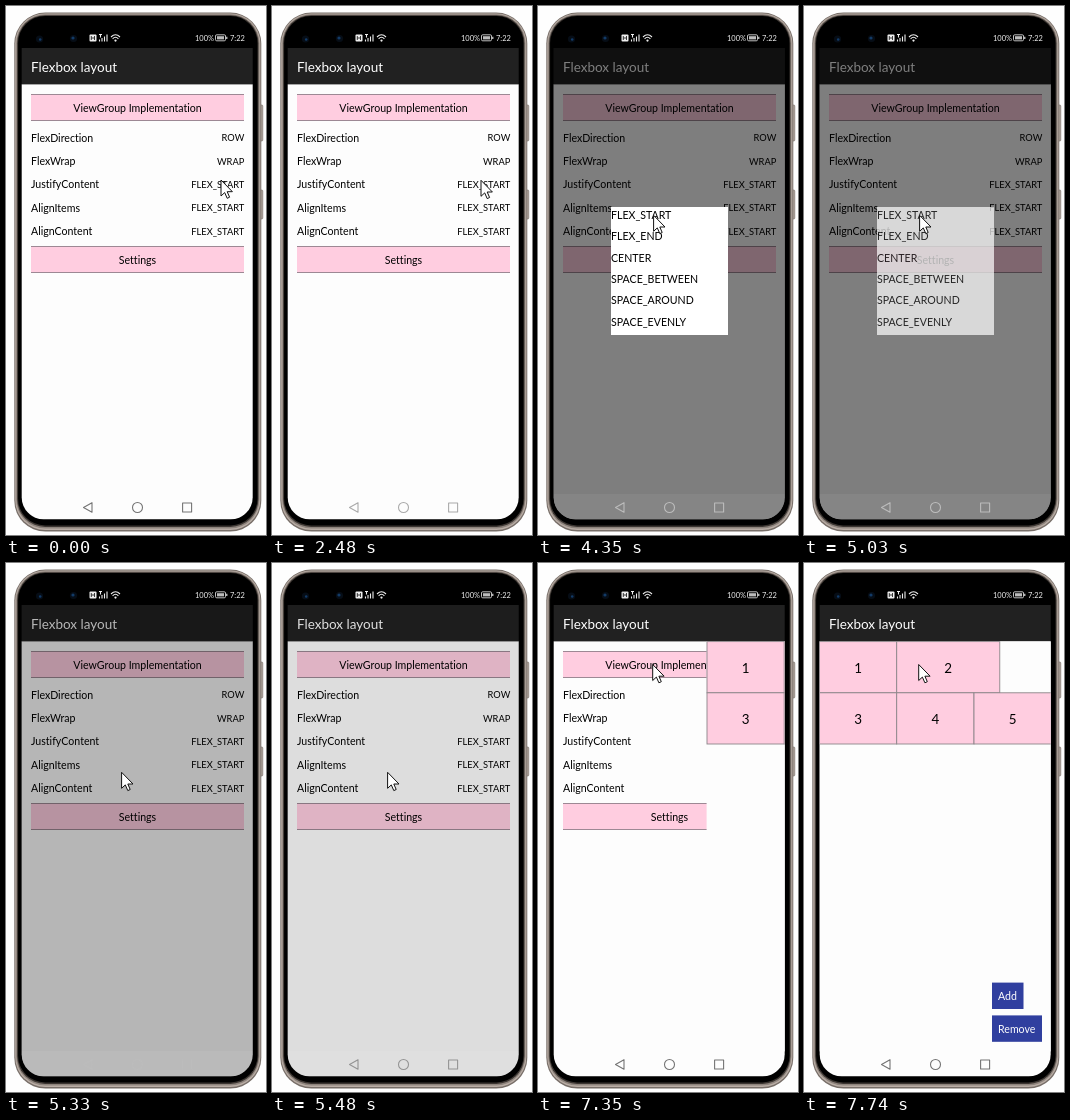
An HTML page for the animation above (8 s loop, 260x529 px).

```html
<!DOCTYPE html>
<html lang="en">
<head>
<meta charset="utf-8">
<title>Flexbox layout</title>
<style>
  html, body { margin: 0; width: 260px; height: 529px; overflow: hidden; background: #fefefe; }
  svg { display: block; }
  text { font-family: Lato, sans-serif; font-size: 10.6px; font-variant-ligatures: none; }
  .title { font-size: 13.5px; fill: #fff; }
  .small { font-size: 9.3px; text-anchor: end; }
  .mid { text-anchor: middle; }
  .number { font-size: 13.4px; text-anchor: middle; }
  .light { fill: #fff; }
  .status { font-size: 7.5px; fill: #eee; }
</style>
</head>
<body>
<svg width="260" height="529" viewBox="0 0 260 529">
  <defs>
    <clipPath id="screen"><rect x="15.7" y="-20" width="231" height="533.3" rx="22"/></clipPath>
  </defs>

  <g fill="#b0a49c" stroke="#766d67" stroke-width=".6">
    <rect x="253.5" y="99" width="3.3" height="36" rx="1"/>
    <rect x="253.5" y="184" width="3.3" height="29" rx="1"/>
  </g>
  <g id="frame"></g>

  <g clip-path="url(#screen)">
    <rect x="15" y="42" width="233" height="37" fill="#212121"/>
    <text class="title" x="25" y="66">Flexbox layout</text>
    <rect x="15" y="78.4" width="233" height="436" fill="#fdfdfd"/>
    <g id="form"></g>
    <g id="page"></g>
    <rect id="dim" x="15" y="42" width="233" height="472"/>
    <rect id="strip" x="15" y="488" width="233" height="26" fill="#fff" opacity=".05"/>
    <g id="nav" fill="none" stroke-width="1.1" stroke-linejoin="round">
      <path d="M77.5 501.5 86 496.7V506.3Z"/>
      <circle cx="131.5" cy="501.5" r="5"/>
      <rect x="176.6" y="497" width="9" height="9"/>
    </g>
    <g id="dialog"></g>
  </g>

  <g fill="#060d16">
    <circle cx="33.5" cy="33" r="3.6"/><circle cx="67.5" cy="32.5" r="3.6"/>
    <g fill="#123a66"><circle cx="34.2" cy="33.5" r="1.3"/><circle cx="67" cy="32" r="1.6"/></g>
  </g>
  <g fill="none" stroke="#eee" stroke-width="1.1">
    <rect x="83.5" y="28.5" width="7" height="7" rx="1" fill="#eee" stroke="none"/>
    <path d="M85.3 30V34M88.5 30V34M85.3 32H88.5" stroke="#111" stroke-width=".8"/>
    <path d="M93 28.5h3M94.5 28.5v3M93.5 35.5v-2M96 35.5v-3.5M98.5 35.5v-5M101 35.5v-7"/>
    <path d="M105 31Q109.5 26.5 114 31M106.6 32.8Q109.5 29.8 112.4 32.8"/>
    <circle cx="109.5" cy="34.6" r=".6"/>
    <rect x="209.5" y="28.8" width="10" height="6" rx="1.2" stroke-width=".8"/>
    <path d="M211 31.8H218" stroke="#bbb" stroke-width="3.2"/>
    <path d="M220.8 30.8V33"/>
  </g>
  <text class="status" x="189" y="34.8">100%</text>
  <text class="status" x="224" y="34.8">7:22</text>

  <path id="cursor" d="M0 0V16L3.7 12.6 6.2 18.3 8.6 17.2 6.2 11.7H11.4Z" fill="#fff" stroke="#111" stroke-linejoin="round"/>
</svg>
<script>
const LOOP = 8000, PINK = '#ffcde0';
const $ = id => document.getElementById(id);
const label = (x, y, text, cls = '') => `<text x="${x}" y="${y}" class="${cls}">${text}</text>`;
const box = (x, y, w, h, fill, extra = '') => `<rect x="${x}" y="${y}" width="${w}" height="${h}" fill="${fill}" ${extra}/>`;

// Metal rim: nested outlines from the outer edge to the black glass.
$('frame').innerHTML = ['#776e68', '#b9ada5', '#8d837c', '#3b3531', '#000'].map((fill, i) =>
  box(8.3 + i * .95, 6.6 + i * .85, 247 - i * 1.9, 519 - i * 2.4, fill, `rx="${31 - i}"`)).join('');

const button = (y, text) => box(25, y, 213, 27, PINK) +
  `<path d="M25 ${y + .5}h213m0 26h-213" stroke="#857780" stroke-width=".8"/>` +
  label(131.5, y + 17.8, text, 'mid');
const rows = { FlexDirection: 'ROW', FlexWrap: 'WRAP', JustifyContent: 'FLEX_START',
  AlignItems: 'FLEX_START', AlignContent: 'FLEX_START' };
$('form').innerHTML = button(88, 'ViewGroup Implementation') + button(240, 'Settings') +
  Object.entries(rows).map(([name, value], i) => {
    const y = 135.6 + i * 23.3;
    return label(25, y, name) + label(238.3, y - .3, value, 'small');
  }).join('');

const options = ['FLEX_START', 'FLEX_END', 'CENTER', 'SPACE_BETWEEN', 'SPACE_AROUND', 'SPACE_EVENLY'];
$('dialog').innerHTML = box(73, 201, 117, 128, '#fff') +
  options.map((text, i) => label(73, 212.8 + i * 21.35, text)).join('');

const CELL = 77.3;
const cell = (n, col, row, w = CELL) => {
  const x = 15.4 + col * CELL, y = 78.6 + row * 51.2;
  return box(x, y, w, 51.2, PINK, 'stroke="#8c8589" stroke-width=".9"') + label(x + w / 2, y + 31, n, 'number');
};
const action = (y, w, text) => box(188, y, w, 26.4, '#303f9f') + label(194, y + 17.2, text, 'light');
$('page').innerHTML = box(15, 78.4, 233, 410, '#fdfdfd') +
  cell(1, 0, 0) + cell(2, 1, 0, CELL * 4 / 3) + [3, 4, 5].map((n, i) => cell(n, i, 1)).join('') +
  action(419.6, 31.5, 'Add') + action(452.4, 50, 'Remove');

// Eased progress in n hard steps, the first at `from`, the last at `to`.
function stepped(t, from, to, n, power = 2) {
  if (t < from) return 0;
  const done = n > 1 ? Math.floor((t - from + 2) / (to - from) * (n - 1)) + 1 : 1;
  return 1 - (1 - Math.min(1, done / n)) ** power;
}
const mix = (a, b, p) => a + (b - a) * p;

const home = { x: 215, y: 174 };
const moves = [
  { from: 120, to: 120, n: 1, x: 215, y: 166 },
  { from: 960, to: 1220, n: 3, x: 209, y: 174.3 },
  { from: 3170, to: 3810, n: 6, x: 119.5, y: 226 },
  { from: 3960, to: 4350, n: 4, x: 115.6, y: 209.3 },
  { from: 5870, to: 6110, n: 3, x: 120, y: 234 },
  { from: 6260, to: 6380, n: 2, x: 114.7, y: 101.5 }
];
function cursorAt(t) {
  return moves.reduce((p, m) => {
    const k = stepped(t, m.from, m.to, m.n, 3);
    return { x: mix(p.x, m.x, k), y: mix(p.y, m.y, k) };
  }, home);
}

const OPEN = 2630, PICK = 5030, CLOSE = 5330;
function draw(t) {
  const { x, y } = cursorAt(t);
  const dim = t < OPEN ? 0 : .5 * (1 - stepped(t, CLOSE, 5720, 4));
  const paleNav = stepped(t, 2230, OPEN, 2) - stepped(t, 5480, 5720, 3);
  const grey = mix(116, 188, paleNav);
  const slide = 240 * (1 - stepped(t, 7230, 7740, 5));
  $('cursor').setAttribute('transform', `translate(${x} ${y})`);
  $('dim').setAttribute('opacity', dim);
  $('strip').setAttribute('visibility', dim ? 'visible' : 'hidden');
  $('dialog').setAttribute('opacity', t < OPEN || t >= CLOSE ? 0 : t < PICK ? 1 : .7);
  $('nav').setAttribute('stroke', `rgb(${grey},${grey},${grey})`);
  $('page').setAttribute('transform', `translate(${slide} 0)`);
}

const start = performance.now();
function tick(now) {
  draw(Math.max(0, now - start) % LOOP);
  requestAnimationFrame(tick);
}
draw(0);
requestAnimationFrame(tick);
</script>
</body>
</html>
```
